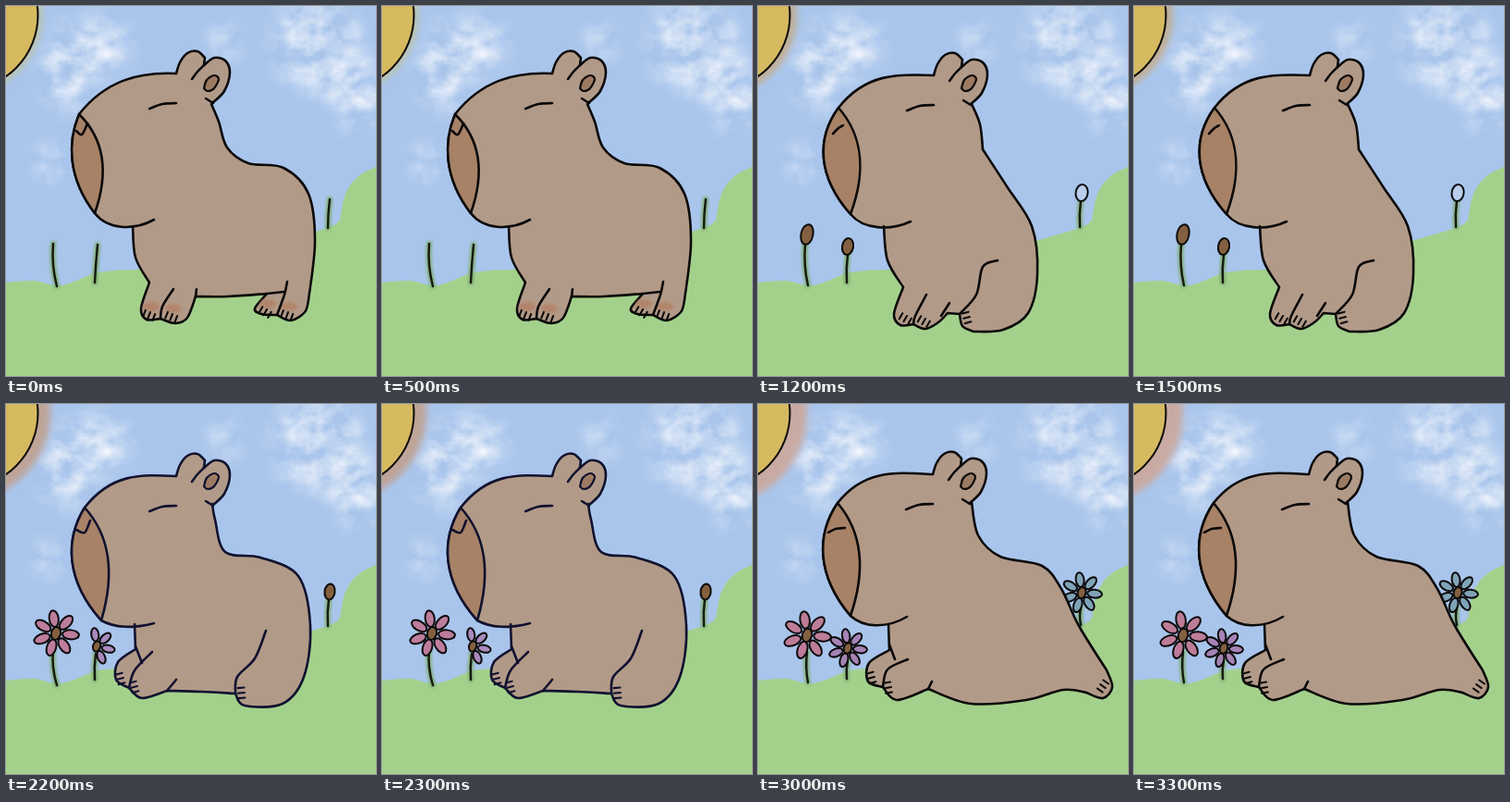
An HTML page that plays this animation: 400x400 px, repeating every 3.5 s.

```html
<!DOCTYPE html>
<html lang="en">
<head>
<meta charset="utf-8">
<title>Capybara in the meadow</title>
<style>
html, body { margin: 0; width: 100%; height: 100%; overflow: hidden; background: #a9c5ec; }
svg { display: block; width: 100vw; height: 100vh; }
path, ellipse { stroke-linecap: round; stroke-linejoin: round; }
.pose { visibility: hidden; animation: 3500ms step-end infinite; }
#stand { animation-name: stand; }
#sit { animation-name: sit; }
#lie { animation-name: lie; }
#stretch { animation-name: stretch; }
@keyframes stand { 0% { visibility: visible } 34.2857%, 100% { visibility: hidden } }
@keyframes sit { 0% { visibility: hidden } 34.2857% { visibility: visible } 62.8571%, 100% { visibility: hidden } }
@keyframes lie { 0% { visibility: hidden } 62.8571% { visibility: visible } 82.8571%, 100% { visibility: hidden } }
@keyframes stretch { 0% { visibility: hidden } 82.8571%, 100% { visibility: visible } }
</style>
</head>
<body>
<svg viewBox="0 0 400 400" preserveAspectRatio="none">
  <defs>
    <filter id="cloud" x="0" y="0" width="400" height="400" filterUnits="userSpaceOnUse">
      <feGaussianBlur in="SourceGraphic" stdDeviation="11" result="soft"/>
      <feTurbulence type="fractalNoise" baseFrequency=".035 .045" numOctaves="5" seed="8"/>
      <feColorMatrix values="0 0 0 0 1  0 0 0 0 1  0 0 0 0 1  1.9 0 0 0 -.55" result="wisps"/>
      <feComposite in="soft" in2="wisps" operator="in"/>
    </filter>
    <filter id="blur" x="-50" y="-50" width="500" height="500" filterUnits="userSpaceOnUse">
      <feGaussianBlur stdDeviation="1.5"/>
    </filter>
    <filter id="glow" x="-200" y="-200" width="400" height="400" filterUnits="userSpaceOnUse">
      <feGaussianBlur stdDeviation="3.5"/>
    </filter>
  </defs>
  <rect width="400" height="400" fill="#a9c5ec"/>
  <g filter="url(#cloud)" fill="#fff" fill-opacity=".85">
    <ellipse cx="66" cy="74" rx="28" ry="38"/>
    <ellipse cx="95" cy="42" rx="38" ry="32"/>
    <ellipse cx="237" cy="38" rx="13" ry="20"/>
    <ellipse cx="47" cy="170" rx="15" ry="19"/>
    <ellipse cx="335" cy="40" rx="46" ry="52"/>
    <ellipse cx="378" cy="92" rx="26" ry="44"/>
  </g>
  <g id="meadow"></g>
  <g id="stand" class="pose"></g>
  <g id="sit" class="pose"></g>
  <g id="lie" class="pose"></g>
  <g id="stretch" class="pose"></g>
</svg>
<script>
const INK = '#0c0a0a', FUR = '#b29a88', BUD = '#83603f';
const [meadow, stand, sit, lie, stretch] =
  ['meadow', 'stand', 'sit', 'lie', 'stretch'].map(id => document.getElementById(id));

function add(parent, tag, attrs) {
  const el = document.createElementNS('http://www.w3.org/2000/svg', tag);
  for (const k in attrs) el.setAttribute(k, attrs[k]);
  return parent.appendChild(el);
}

// Smooth curve through points; "|" marks a sharp corner.
function curve(text, dx = 0, dy = 0) {
  return text.split('|').map((part, n) => {
    const p = part.trim().split(/\s+/).map(s => {
      const [x, y] = s.split(',').map(Number);
      return [x + dx, y + dy];
    });
    let d = (n ? 'L' : 'M') + p[0];
    for (let i = 0; i < p.length - 1; i++) {
      const a = p[i - 1] || p[i], b = p[i], c = p[i + 1], e = p[i + 2] || c;
      const c1 = b.map((v, k) => v + (c[k] - a[k]) / 6);
      const c2 = c.map((v, k) => v - (e[k] - b[k]) / 6);
      d += `C${c1} ${c2} ${c}`;
    }
    return d;
  }).join('');
}

function draw(g, d, ink = INK, fill = 'none', width = 2.6) {
  return add(g, 'path', { d, fill, stroke: ink, 'stroke-width': width });
}

function oval(g, cx, cy, rx, ry, turn, fill) {
  add(g, 'ellipse', { cx, cy, rx, ry, fill, stroke: INK, 'stroke-width': 2,
    transform: `rotate(${turn} ${cx} ${cy})` });
}

function stem(g, x, top, foot, lean) {
  const d = `M${x} ${top}Q${x - 2} ${(top + foot) / 2} ${x + lean} ${foot}`;
  draw(g, d, '#7fae74', 'none', 6).setAttribute('filter', 'url(#blur)');
  draw(g, d, '#15180f', 'none', 2.4);
}

function flower(g, x, y, r, color, petals = 7, span = 360) {
  for (let i = 0; i < petals; i++) {
    const turn = i * span / petals - 8, t = turn * Math.PI / 180;
    oval(g, x + .64 * r * Math.sin(t), y - .64 * r * Math.cos(t), r * .2, r * .36, turn, color);
  }
  oval(g, x, y, r * .2, r * .28, 15, BUD);
}

function sun(g, color, width) {
  const disc = { cx: -46, cy: 10, r: 80.5 };
  add(g, 'circle', { ...disc, fill: 'none', stroke: color, 'stroke-width': width, opacity: .75, filter: 'url(#glow)' });
  add(g, 'circle', { ...disc, fill: '#d5ba60', stroke: INK, 'stroke-width': 2 });
}

// Three toe lines side by side, pointing along the angle.
function toes(g, x, y, angle, ink) {
  const t = angle * Math.PI / 180, ux = Math.cos(t), uy = Math.sin(t);
  for (const i of [-1, 0, 1])
    draw(g, `M${x - uy * i * 5.5} ${y + ux * i * 5.5}l${ux * 7} ${uy * 7}`, ink, 'none', 2.1);
}

// The head is one template: "tilt" moves ears and eye, "top" and "base" are the muzzle tips.
function capybara(g, { body, tilt: [dx, dy], top: [tx, ty], base: [bx, by], chin, bulge = 30,
  lines, paws, blush, ink = INK }) {
  const ears = curve('224,104 236,92 242,72 237,59 225,56 214,64|215,56 207,49 196,51 188,61 184,73', dx, dy);
  const mid = (tx + bx) / 2, h = by - ty;
  const side = x => [`${x} ${ty + .28 * h}`, `${x} ${by - .36 * h}`];
  const left = side(mid - bulge), right = side(mid + 22);
  const face = `C${145 + dx} ${71 + dy} ${tx + 29} ${ty - 37} ${tx} ${ty}C${left} ${bx} ${by}`;
  draw(g, curve(body) + ears.replace('M', 'L') + face + `C${bx + 14} 242 ${chin[0] - 22} 243 ${chin}`, ink, FUR);
  draw(g, `M${tx} ${ty}C${left} ${bx} ${by}C${right.reverse()} ${tx} ${ty}`, ink, '#a78266');
  draw(g, curve('214,64 207,71 201,79', dx, dy), ink);
  draw(g, curve('216,100 224,105', dx, dy), ink);
  draw(g, curve('155,111 169,106 184,105', dx, dy), ink);
  draw(g, curve('214,89 217,80 225,75 230,79 225,89 218,92 214,89', dx, 0), ink, '#9d7b62', 2.2);
  for (const [x, y] of blush ? paws : [])
    add(g, 'ellipse', { cx: x + 1, cy: y - 6, rx: 9, ry: 5, fill: '#b27c60', opacity: .7, filter: 'url(#blur)' });
  for (const l of lines) draw(g, curve(l), ink);
  for (const p of paws) toes(g, ...p, ink);
}

add(meadow, 'path', { fill: '#a3d18c', d:
  curve('-2,299 30,297 60,302 100,288 140,285|300,254 350,239 361,231|361,231 367,203 381,184 402,173') + 'V402H-2Z' });

sun(stand, '#c5c48c', 9);
stem(stand, 51, 257, 303, 4);
stem(stand, 99, 258, 299, -3);
stem(stand, 350, 209, 240, -2);
capybara(stand, {
  body: '137,238 140,272 155,299|155,299 146,327 152,339 167,338|167,338 183,343 196,337 205,314|205,314 240,314 282,311|' +
    '282,311 269,327 276,333 293,334|293,334 308,340 323,331 327,318|327,318 334,255 327,203 300,175 262,170 239,153 230,125 222,106',
  tilt: [0, 0], top: [79, 117], base: [96, 224], chin: [160, 231], bulge: 21,
  lines: ['76,135 82,139 88,127', '181,306 169,325 167,338', '304,298 301,312 293,334', '282,311 300,309', '205,314 206,306'],
  paws: [[156, 331, 112], [180, 333, 112], [282, 328, 120], [305, 331, 110]], blush: true
});

sun(sit, '#c9a778', 15);
stem(sit, 51, 258, 302, 3);
stem(sit, 97, 269, 299, -1);
stem(sit, 349, 211, 239, -1);
oval(sit, 53, 247, 6.5, 11, 12, BUD);
oval(sit, 97, 260, 6, 9, 10, BUD);
oval(sit, 350, 202, 6.5, 9, 8, '#b9cdec');
capybara(sit, {
  body: '136,238 140,275 157,304|157,304 147,333 154,345 168,344|168,344 181,349 195,342 205,332|205,332 218,333|' +
    '218,333 221,346 233,352|233,352 265,350 292,332 302,290 296,238 269,195 243,155|243,155 240,128 231,106',
  tilt: [6, 2], top: [87, 110], base: [100, 225], chin: [165, 233],
  lines: ['81,138 87,132 92,129', '182,312 170,335 168,344', '198,335 207,321', '259,275 243,282 236,312 218,333'],
  paws: [[161, 335, 120], [181, 338, 120], [229, 336, 165]]
});

sun(lie, '#c59a7c', 27);
stem(lie, 51, 265, 304, 4);
stem(lie, 97, 270, 298, -1);
stem(lie, 349, 211, 240, -1);
flower(lie, 54, 248, 25, '#bd7d9c');
flower(lie, 98, 262, 20, '#a98abb', 4, 220);
oval(lie, 350, 203, 5.5, 8.5, 8, BUD);
capybara(lie, {
  ink: '#11122f',
  body: '139,238 140,265|140,265 121,279 119,298 133,307|133,307 147,318 174,310|174,310 211,311 248,313|' +
    '248,313 258,326 299,324 322,295 329,240 316,186 275,166 237,160 226,125 223,108',
  tilt: [0, 5], top: [85, 112], base: [103, 234], chin: [160, 237],
  lines: ['76,136 85,139 91,126', '140,262 147,280', '158,268 139,288 133,307', '174,310 184,298', '281,245 269,275 250,295 248,313'],
  paws: [[127, 296, 165], [142, 305, 165], [258, 312, 175]]
});

sun(stretch, '#d3a28a', 37);
stem(stretch, 53, 268, 301, 1);
stem(stretch, 97, 277, 297, -1);
stem(stretch, 349, 220, 239, 0);
flower(stretch, 53, 250, 26, '#bd7d98');
flower(stretch, 97, 264, 21, '#a583b5');
flower(stretch, 350, 204, 22, '#7fa3b8');
capybara(stretch, {
  body: '141,238 142,266|142,266 120,280 119,300 135,306|135,306 150,320 184,308|184,308 230,324 290,320 330,309 355,312|' +
    '355,312 373,318 383,306 377,288|377,288 347,240 328,200 307,175 262,165 238,142 231,106',
  tilt: [5, 3], top: [86, 107], base: [100, 229], chin: [161, 230],
  lines: ['76,139 84,135 94,134', '142,260 148,276', '162,276 140,287 135,306', '184,308 188,300'],
  paws: [[126, 295, 165], [144, 306, 170], [370, 303, 35]]
});
</script>
</body>
</html>
```
